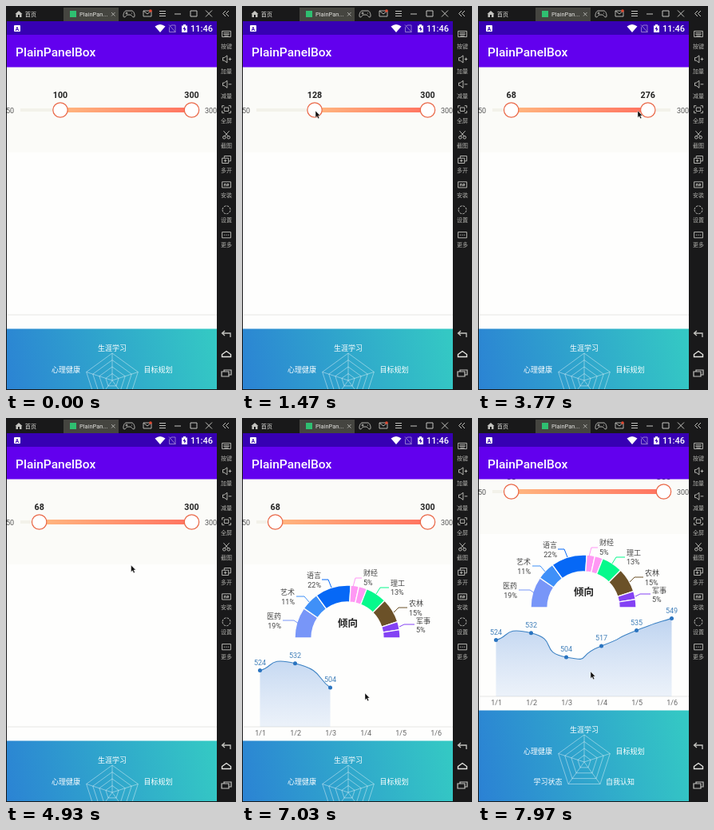
Write an HTML page that moves like this. It is 288 by 480 pixels and loops after 8000 ms.

```html
<!DOCTYPE html>
<html lang="zh-CN">
<head>
<meta charset="utf-8">
<title>PlainPanelBox</title>
<style>
html, body { margin: 0; width: 100%; height: 100%; overflow: hidden; background: #19191a; }
svg { display: block; width: 100vw; height: 100vh; }
text { font-family: Roboto, "Noto Sans CJK SC", "Noto Sans CJK", sans-serif; }
</style>
</head>
<body>
<svg id="stage" viewBox="0 0 288 480" xmlns="http://www.w3.org/2000/svg">
  <defs>
    <clipPath id="view"><rect x="1" y="76" width="263" height="403"/></clipPath>
    <linearGradient id="bar" gradientUnits="userSpaceOnUse" x1="0" x2="1">
      <stop offset="0" stop-color="#ffb780"/><stop offset="1" stop-color="#ff7260"/>
    </linearGradient>
    <linearGradient id="sea" gradientUnits="userSpaceOnUse" x1="1" y1="500" x2="264" y2="440">
      <stop offset="0" stop-color="#2b82d4"/><stop offset="1" stop-color="#34c8c4"/>
    </linearGradient>
    <linearGradient id="shade" gradientUnits="userSpaceOnUse" x1="0" y1="288" x2="0" y2="386">
      <stop offset="0" stop-color="#4a86d8" stop-opacity=".36"/><stop offset="1" stop-color="#7aa6e4" stop-opacity=".14"/>
    </linearGradient>
  </defs>
  <rect width="288" height="480" fill="#19191a"/>
  <g clip-path="url(#view)">
    <rect x="1" y="76" width="263" height="403" fill="#fefefd"/>
    <g id="page">
      <rect x="1" y="76" width="263" height="107" fill="#fbfbf8"/>
      <path d="M18 130H241" stroke="#f3f2ea" stroke-width="4"/>
      <g id="slider"></g>
      <g id="pie"></g>
      <path d="M1 386H264" stroke="#e6e6e4"/>
      <g id="line"></g>
      <rect x="1" y="403.500" width="263" height="240" fill="url(#sea)"/>
      <g id="radar" fill="none" stroke="#fff" stroke-opacity=".6" stroke-width=".7"></g>
    </g>
  </g>
  <rect x="1" y="19" width="263" height="17.500" fill="#3700b3"/>
  <rect x="1" y="36" width="263" height="40.500" fill="#6200ee"/>
  <g id="chrome"></g>
  <path id="cursor" d="M0 0V8.500L1.900 6.700L3.300 9.800L4.800 9.100L3.400 6H5.900Z" fill="#111" stroke="#fff" stroke-width=".4"/>
</svg>
<script>
const LOOP = 8000;
const $ = id => document.getElementById(id);

function label(s, x, y, size, fill, anchor = "middle", weight = 400) {
  return `<text x="${x}" y="${y + size * 0.36}" font-size="${size}" fill="${fill}" text-anchor="${anchor}" font-weight="${weight}">${s}</text>`;
}
const stroke = (d, color, width = 1, more = "") =>
  `<path d="${d}" fill="none" stroke="${color}" stroke-width="${width}" ${more}/>`;

// Interpolates rows of [time, ...values] with a soft ease.
function track(keys, t) {
  if (t <= keys[0][0]) return keys[0].slice(1);
  for (let i = 1; i < keys.length; i++) {
    const a = keys[i - 1], b = keys[i];
    if (t <= b[0]) {
      const u = (t - a[0]) / (b[0] - a[0]);
      const e = u * u * (3 - 2 * u);
      return a.slice(1).map((v, j) => v + (b[j + 1] - v) * e);
    }
  }
  return keys[keys.length - 1].slice(1);
}

// Range slider
const LOW = [[950, 100], [1470, 128], [1850, 224], [2850, 224], [3400, 68]];
const HIGH = [[2350, 300], [2530, 281], [2620, 276], [3860, 276], [4180, 300]];
const valueX = v => 68 + (v - 100) * 0.8225;

function drawSlider(t) {
  const values = [track(LOW, t)[0], track(HIGH, t)[0]];
  const [a, b] = values.map(valueX);
  $("bar").setAttribute("x1", a);
  $("bar").setAttribute("x2", b);
  $("slider").innerHTML =
    `<rect x="${a}" y="127" width="${b - a}" height="6" fill="url(#bar)"/>` +
    label("50", 10, 130.5, 9, "#555", "end") + label("300", 249, 130.5, 9, "#555", "start") +
    values.map(v => `<circle cx="${valueX(v)}" cy="130" r="9.200" fill="#fff" stroke="#ea6848" stroke-width="1.200"/>` +
      label(Math.round(v), valueX(v), 111.5, 10.7, "#222", "middle", 700)).join("");
}

// Half ring: share, colour, name, text x, text y, leader path
const SLICES = [
  [19, "#7896f8", "医药", 49, 248, "M51 253H65L71 257"],
  [11, "#3f90f8", "艺术", 66, 218, "M68 223H78L84 230"],
  [22, "#0668f6", "语言", 99, 197, "M100 202H108L112 212"],
  [5, "#ff98f4", "财经", 152, 194, "M150 200H142L139 211"],
  [5, "#ff98f4"],
  [13, "#06f98c", "理工", 186, 206.5, "M184 212H173L168 220"],
  [15, "#6b5128", "农林", 209, 232, "M207 237H196L190 243"],
  [5, "#8442f4", "军事", 218, 253.5, "M216 258H203L197 261"],
  [5, "#8442f4"]
];
const polar = (cx, cy, r, deg) => {
  const a = deg * Math.PI / 180;
  return (cx + r * Math.cos(a)).toFixed(2) + " " + (cy - r * Math.sin(a)).toFixed(2);
};

function drawPie(count) {
  let from = 180, out = "";
  SLICES.slice(0, count).forEach(([share, color, name, x, y, leader]) => {
    const to = from - share * 1.8;
    const p = (r, deg) => polar(132, 275, r, deg);
    out += `<path d="M${p(66, from)}A66 66 0 0 1 ${p(66, to)}L${p(45, to)}A45 45 0 0 0 ${p(45, from)}Z" fill="${color}" stroke="#fefefd" stroke-width="1.300"/>`;
    if (name) {
      const anchor = x < 132 ? "end" : "start";
      out += stroke(leader, color) + label(name, x, y, 9, "#444", anchor) + label(share + "%", x, y + 11.3, 9, "#444", anchor);
    }
    from = to;
  });
  if (count) out += label("倾向", 132.5, 256, 12.5, "#222", "middle", 700);
  $("pie").innerHTML = out;
}

// Line chart: the curve is rebuilt each time a point joins.
const SCORES = [524, 532, 504, 517, 535, 549];
const POINTS = SCORES.map((v, i) => [22.5 + 44 * i, 337 - (v - 504) * 1.08]);

function curve(pts) {
  const k = 0.4, at = i => pts[Math.max(0, Math.min(pts.length - 1, i))];
  const arm = (i, s) => [0, 1].map(j => at(i)[j] + s * k * (at(i + 1)[j] - at(i - 1)[j]));
  return "M" + pts[0] + pts.slice(1).map((p, i) => `C${arm(i, 1)} ${arm(i + 1, -1)} ${p}`).join("");
}

function drawLine(count) {
  if (!count) { $("line").innerHTML = ""; return; }
  const pts = POINTS.slice(0, count), d = curve(pts);
  $("line").innerHTML =
    `<path d="${d}V386H${pts[0][0]}Z" fill="url(#shade)"/>` + stroke(d, "#3c82c4", 1.1) +
    pts.map(([x, y], i) => `<circle cx="${x}" cy="${y}" r="2.500" fill="#2a74c0"/>` + label(SCORES[i], x, y - 10, 9, "#4280ba")).join("") +
    POINTS.map(([x], i) => label("1/" + (i + 1), x + 0.7, 394, 9, "#666")).join("");
}

// Radar
function drawRadar() {
  const ring = r => "M" + [90, 18, -54, -126, 162].map(a => polar(133, 468, r, a)).join("L") + "Z";
  let out = "";
  for (let i = 1; i <= 4; i++) out += `<path d="${ring(8.5 * i)}"/>`;
  for (let i = 0; i < 5; i++) out += `<path d="M133 468L${polar(133, 468, 34, 90 + 72 * i)}"/>`;
  const names = [["生涯学习", 133, 428], ["目标规划", 190.5, 455], ["心理健康", 75, 455], ["学习状态", 87.5, 493], ["自我认知", 178, 493]];
  out += `<g stroke="none">${names.map(([s, x, y]) => label(s, x, y, 9, "#fff")).join("")}</g>`;
  $("radar").innerHTML = out;
}

// Window frame, status bar and tool strip
function drawChrome() {
  const ink = "#c4c4c0";
  const tools = [
    ["按键", "M-6 -4H6V4H-6ZM-4 -1.500H4M-4 .5H4M-3 2.500H3"],
    ["加量", "M-5 -2H-3L1 -5V5L-3 2H-5ZM3 0H7M5 -2V2"],
    ["减量", "M-5 -2H-3L1 -5V5L-3 2H-5ZM3 0H7"],
    ["全屏", "M-6 -2V-5H-3M3 -5H6V-2M6 2V5H3M-3 5H-6V2M-3 -2.500H3V2.500H-3Z"],
    ["截图", "M-4 -5L3 3M4 -5L-3 3M-5 4A2 2 0 1 0 -1 4A2 2 0 1 0 -5 4M1 4A2 2 0 1 0 5 4A2 2 0 1 0 1 4"],
    ["多开", "M-6 -2H3V5H-6ZM-3 -2V-5H6V2H3M-3.500 1.500H.5M-1.500 -.5V3.500"],
    ["安装", "M-6 -4H6V4H-6ZM-3 2V-1H-1V2M1 2V-1H3V1H1"],
    ["设置", "M-5.500 0A5.500 5.500 0 1 0 5.500 0A5.500 5.500 0 1 0 -5.500 0"],
    ["更多", "M-6 -4H6V4H-6ZM-3.500 0H-2M-.7 0H.7M2 0H3.500"]
  ];
  let out = `<rect x="72" y="2" width="69" height="17" fill="#454540"/>` +
    `<path d="M11.500 10L16 6L20.500 10H19.500V14H17V11H15V14H12.500V10Z" fill="${ink}"/>` +
    label("首页", 31, 10, 7.2, "#e2e2de") +
    `<rect x="80" y="6" width="8" height="8" fill="#2fbf71"/>` +
    label("PlainPan...", 92, 10, 7.5, "#e2e2de", "start") +
    stroke("M132 8L136.500 12.500M136.500 8L132 12.500", ink, .8) +
    stroke("M150 6H158C161 7 162 14 160 14C158 14 157 11 156 11H152C151 11 150 14 148 14C146 14 147 7 150 6ZM149.500 9H152.500M151 7.500V10.500M157 9H158", ink, .9) +
    stroke("M172 6H182V13H172ZM172 6L177 10L182 6", ink, .9) + `<circle cx="181" cy="6" r="1.800" fill="#e2472f"/>` +
    stroke("M192 6.500H200M192 9.500H200M192 12.500H200M211 10H219M231 6H239V13H231ZM250 5.500L258 13.500M258 5.500L250 13.500M275 6L271.500 9.500L275 13M279 6L275.500 9.500L279 13", ink);

  tools.forEach(([name, d], i) => {
    const y = 35 + 31.4 * i;
    out += stroke(d, ink, 1, `transform="translate(276 ${y}) scale(.9)"` + (name === "设置" ? ' stroke-dasharray="3 1.300" stroke-width="1.600"' : "")) +
      label(name, 276, y + 15.5 - i * 0.35, 7, "#b0b0ac");
  });
  out += stroke("M274 406L270.500 409L274 412M270.500 409H281V414", ink, 1.3) +
    stroke("M270.500 435.500L276 431.500L281.500 435.500V438.500H270.500Z", "#e4e4e0", 1.4) +
    stroke("M270 457H279V463H270ZM273 457V455H282V461H279", ink, 1.2);

  out += `<rect x="10" y="24" width="8" height="8" rx="1" fill="#fff"/>` + label("A", 14, 28.2, 6.5, "#3700b3", "middle", 700) +
    `<path d="M186.500 25.500Q193 20.500 199.500 25.500L193 33Z" fill="#fff"/>` +
    stroke("M207 24H212V32.500H204.500V26.500ZM204 23.500L212.500 33", "#9a82d4", .9) +
    `<path d="M220 24.500H222V23H225V24.500H227V33H220Z" fill="#fff"/><path d="M224 25.500L221.500 29H223.300V32L225.700 28.300H224Z" fill="#3700b3"/>` +
    label("11:46", 245, 28, 11, "#fff", "middle", 500) +
    label("PlainPanelBox", 12, 57.5, 15.5, "#fff", "start", 500);
  $("chrome").innerHTML = out;
}

const POINTER = [
  [250, 100, 190], [850, 69, 131], [950, 69, 131], [1470, 92, 131], [1850, 171, 129], [2130, 229, 125],
  [2350, 229, 125], [2530, 213, 125], [2620, 209, 126], [2850, 171, 130], [3400, 42, 131], [3770, 200, 131],
  [3860, 211, 131], [4180, 231, 131], [4500, 231, 131], [5200, 120, 210], [6050, 120, 210], [6680, 154, 344],
  [7080, 154, 344], [7600, 143, 355], [7690, 143, 355], [7970, 141, 317], [8000, 141, 314]
];
const SCROLL = [[7690, 0], [7970, 38], [8000, 41]];
const STEP = 165;
const shown = (t, start, max) => t < start ? 0 : Math.min(max, 1 + Math.floor((t - start) / STEP));

let pieCount = -1, lineCount = -1;
function render(t) {
  drawSlider(t);
  const p = shown(t, 5240, SLICES.length), n = shown(t, 6690, POINTS.length);
  if (p !== pieCount) drawPie(pieCount = p);
  if (n !== lineCount) drawLine(lineCount = n);
  $("page").setAttribute("transform", `translate(0 ${-track(SCROLL, t)[0]})`);
  const [x, y] = track(POINTER, t);
  $("cursor").setAttribute("transform", `translate(${x} ${y})`);
  $("cursor").setAttribute("opacity", t < POINTER[0][0] ? 0 : 1);
}

drawRadar();
drawChrome();
const begin = performance.now();
function tick() {
  render((performance.now() - begin) % LOOP);
  requestAnimationFrame(tick);
}
tick();
</script>
</body>
</html>
```
